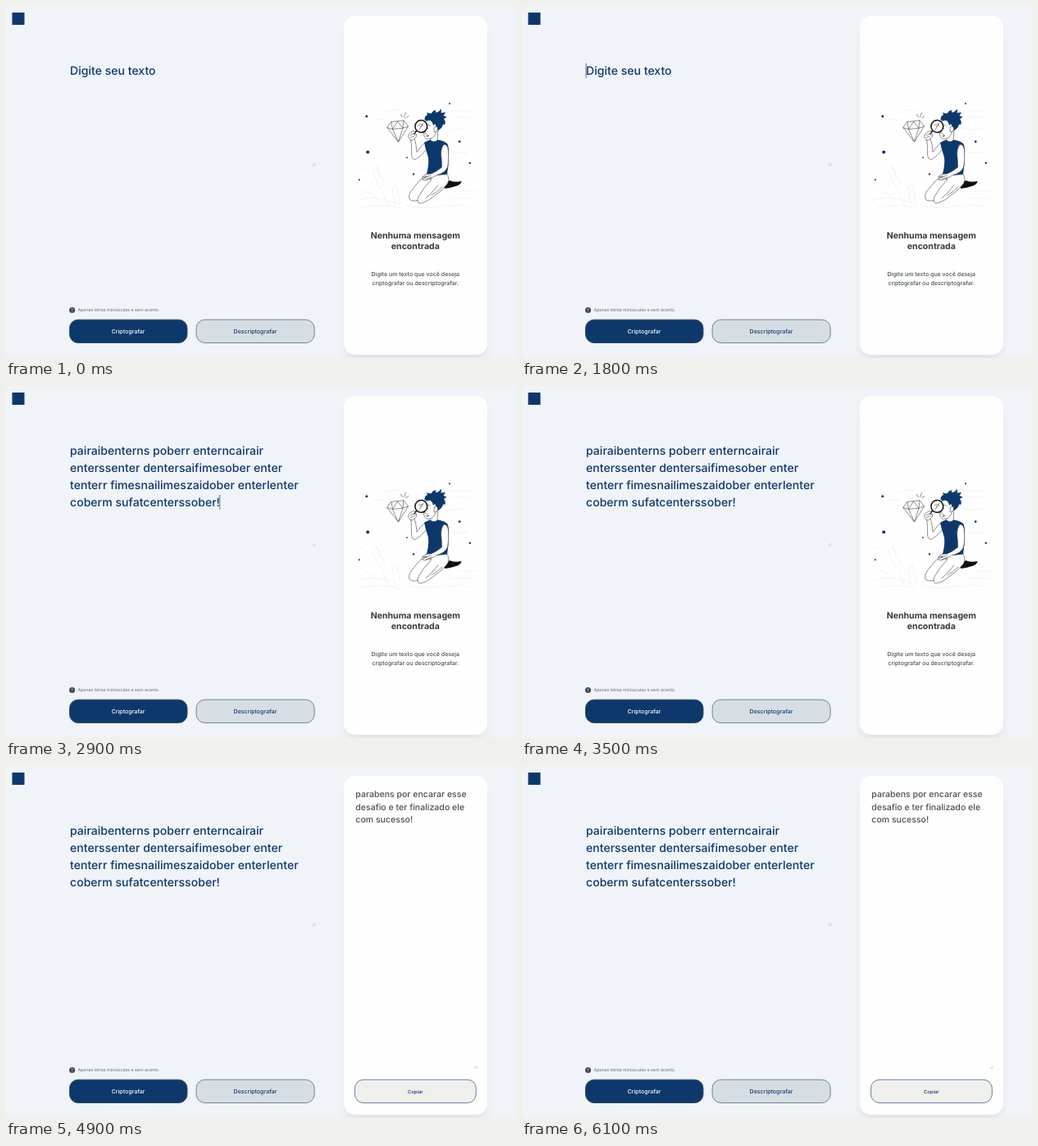
Recreate the animation shown at these times as an HTML page. Size 622x430 px, loop 8 s.

```html
<!DOCTYPE html>
<html lang="pt-BR">
<head>
<meta charset="utf-8">
<title>Criptografar texto</title>
<style>
  html, body { margin: 0; width: 100%; height: 100%; overflow: hidden; background: #f0f3f8; }
  #stage { position: relative; width: 622px; height: 430px; overflow: hidden; }
  #card {
    position: absolute; left: 411.5px; top: 11.5px; width: 175.5px; height: 414.5px;
    border-radius: 14px; background: #fdfefd; box-shadow: 0 10.5px 14px -3.5px rgba(0, 0, 0, .08);
  }
  svg { position: absolute; left: 0; top: 0; }
  text { font-family: Inter, sans-serif; font-weight: 500; text-rendering: geometricPrecision; }
  .navy { fill: #0d386c; }
  .input { font-size: 14.08px; fill: #0d386c; }
  .result { font-size: 10.56px; fill: #495057; }
  .title { font-size: 10.56px; font-weight: 700; fill: #343a40; text-anchor: middle; }
  .hint { font-size: 7.04px; fill: #495057; text-anchor: middle; }
  .label { font-size: 7.04px; text-anchor: middle; }
  .copy { font-size: 5.87px; text-anchor: middle; }
  .help { font-size: 5.28px; font-weight: 400; fill: #676c73; }
  .grip { stroke: #9a9ea5; stroke-width: .6; fill: none; }
  .ghost { fill: none; stroke: #edeeee; stroke-width: .7; stroke-linecap: round; }
  .ink, .skin { fill: none; stroke: #333; stroke-width: .55; stroke-linecap: round; stroke-linejoin: round; }
  .skin { fill: #fdfefd; }
</style>
</head>
<body>
<div id="stage">
  <div id="card"></div>
  <svg width="622" height="430" viewBox="0 0 622 430">
    <rect class="navy" x="7.5" y="8" width="15" height="15"/>

    <g id="placeholder"></g>
    <g id="typed"></g>
    <rect id="caret" class="navy" width=".7" height="18"/>
    <path class="grip" d="M374 195.3l3.2-3.2M376 195.3l1.2-1.2"/>

    <circle cx="80.6" cy="371.5" r="3.5" fill="#41464c"/>
    <path d="M80.6 369.5v2.3M80.6 373v.6" stroke="#fff" stroke-width=".75"/>
    <text class="help" x="87.5" y="373.4">Apenas letras minúsculas e sem acento.</text>

    <rect x="77.5" y="383.2" width="143.5" height="28.3" rx="10.5" fill="#0d386c" stroke="#2f4850" stroke-width=".9"/>
    <text class="label" x="149.1" y="400.4" fill="#fff">Criptografar</text>
    <rect x="232.1" y="383.2" width="144" height="28.3" rx="10.5" fill="#d7dee3" stroke="#5c7d8c" stroke-width=".9"/>
    <text class="label navy" x="304" y="400.4">Descriptografar</text>

    <g id="empty">
      <g class="ghost">
        <path d="M447 202l5-6 10 21-6 5zM452 196l4 13M471 221l5-3 5 23M471 221l3 20M459 226l8 19M446 229l7 8M444 215l5 4"/>
        <path d="M430 237q14-4 25-2t25 8M434 246q25-5 47 1M487 243q20 7 50 0M540 235h32M536 246q15-5 28-1M434 224l12 6"/>
        <path d="M460 130q12-5 22-2M447 139h14M539 128h28M545 136h22M537 150q14 3 24-1M545 179h18M552 226h22M431 196l8 5"/>
      </g>

      <g id="dots" class="navy"></g>

      <g class="ink">
        <path d="M470 141.5L485 139.8 490.5 147 478.5 166 465 148.8zM465 148.8L471.5 150.5 484 149.2 490.5 147M471.5 150.5L478.5 166 484 149.2M470 141.5L471.5 150.5 477.5 141 484 149.2 485 139.8"/>
        <path d="M481.5 132.3l1.7 3.2M487.6 130.2l-2.2 5.3M491 134.6l-3.4 2"/>
      </g>

      <!-- shoe, far leg, near leg -->
      <path d="M534 221q3-5 7-8 5 3 14.500 1 0 3-5 5.500-7 2.500-15 3.500z" fill="#111"/>
      <path class="skin" d="M514 204q-12 11-20 22-4 7-1.500 10.500 3 2.500 11 1 10-5 18-16z"/>
      <path class="skin" d="M519 204h18.500q4 7 1 13-8 10-19 17-9 7-15 7-4-2-1.500-8 6-11 15-20z"/>
      <path class="ink" d="M527 219q-8 10-15 16M532 221q-7 7-13 10"/>

      <!-- raised arm -->
      <path class="skin" d="M493.500 162q1.500 12 1 19 .5 7 5 6.500 7-4 13-12l-1-9q-6 5-10.500 12-.5-10-3-17z"/>

      <!-- neck, head and hair -->
      <path class="skin" d="M517.500 157l.5 8q4 4 8 0l1-15-6-2z"/>
      <path class="skin" d="M511.500 141q-2 8-2 14 0 7 5 7.500 6 0 9-6l4-10-4-8z"/>
      <path class="navy" d="M510.500 139q0-5 3.500-6l-1-3q4 2 6 1 1-3 5-4l0 3q4 0 6.500-4.500 1 3 0 5l5.500-.5-2.500 4 4 1.500-3.500 2.500q3 4 1 7l-2-.5q-1 5-6 7.500l-2.500 0q1-5-1.500-8l-2 2q-1-6-5-6.500-3 1-5.500-.5z"/>
      <path class="skin" d="M522.500 148q4-2 4 2t-4 4z"/>
      <path class="ink" d="M514 146q2-1 3.500 0M514.500 149v1M512 152l-1.500 3 2 .5"/>
      <circle cx="514" cy="158.500" r="1.200" class="ink"/>

      <!-- torso -->
      <path class="navy" d="M510 167q4-3 7.500-3.500 4 4 9 0 8 1 12 5 2 5 1.500 14 0 12-2 23-12 2.500-25-.5 3-11 2-20-3-9-5-18z"/>

      <!-- resting arm -->
      <path class="skin" d="M534 169q5 0 5.500 8 1 11-1 20-3 7-13 9.500-7 5-15 6.500l-3-1 6-4-6 1q3-4 11-4 7-3 13-8 0-8-1-16 0-8 3.500-12z"/>
      <path class="ink" d="M510 210l8-3M512 212l7-3"/>

      <!-- hand and magnifier -->
      <path d="M500.500 152.500l-4 5.500" stroke="#111" stroke-width="1.600" stroke-linecap="round"/>
      <path class="skin" d="M493 163.500l-2.500-4q0-3 3-5l4-2 1.500 2-2 2 3.500 0 0 3-4 4z"/>
      <path class="ink" d="M493 158l4-2M493.500 160.500l5-2"/>
      <circle cx="506.300" cy="147" r="7.400" fill="#fdfefd" fill-opacity=".9" stroke="#111" stroke-width="1.500"/>
      <path class="ink" d="M503 146q3-3 6 0M506 146.500v1M504 151l5-8"/>

      <g id="title"></g>
      <g id="hint"></g>
    </g>

    <g id="done">
      <g id="result"></g>
      <path class="grip" d="M571 369.800l3.200-3.200M573 369.800l1.200-1.200"/>
      <rect x="425.500" y="383.200" width="147.800" height="28.300" rx="10.500" fill="#efefec" stroke="#58759a" stroke-width=".9"/>
      <text class="copy navy" x="499.300" y="399.700">Copiar</text>
    </g>
  </svg>
</div>
<script>
  const LOOP = 8000;
  const byId = id => document.getElementById(id);
  const NS = 'http://www.w3.org/2000/svg';

  function add(parent, tag, attrs, content = '') {
    const el = document.createElementNS(NS, tag);
    for (const key in attrs) el.setAttribute(key, attrs[key]);
    el.textContent = content;
    byId(parent).append(el);
  }

  function addLines(parent, cls, x, y, leading, lines) {
    lines.forEach((line, i) => add(parent, 'text', { class: cls, x, y: y + i * leading }, line));
  }

  addLines('placeholder', 'input', 78, 83.8, 21.1, ['Digite seu texto']);
  addLines('typed', 'input', 78, 83.8, 21.1, [
    'pairaibenterns poberr enterncairair',
    'enterssenter dentersaifimesober enter',
    'tenterr fimesnailimeszaidober enterlenter',
    'coberm sufatcenterssober!'
  ]);
  addLines('title', 'title', 499.3, 284.2, 12.7, ['Nenhuma mensagem', 'encontrada']);
  addLines('hint', 'hint', 499.3, 330.2, 10.56, [
    'Digite um texto que você deseja', 'criptografar ou descriptografar.'
  ]);
  addLines('result', 'result', 426.3, 37.7, 15.84, [
    'parabens por encarar esse', 'desafio e ter finalizado ele', 'com sucesso!'
  ]);

  const dots = [
    [439.8, 134.7, 1.5], [441.2, 178.5, 2], [541, 119.3, 1], [553.2, 165.7, 1.4],
    [565.8, 191.7, 1.2], [497, 205.4, 1.2], [489, 185.2, .9], [430.8, 212.2, 1]
  ];
  for (const [cx, cy, r] of dots) add('dots', 'circle', { cx, cy, r });

  // start time, text pasted, result shown, caret position
  const START = [77.7, 70], END = [260.5, 133];
  const steps = [
    [0, false, false, null],
    [1800, false, false, START],
    [2500, false, false, null],
    [2900, true, false, END],
    [3500, true, false, null],
    [4100, true, false, END],
    [4600, true, false, null],
    [4900, true, true, null]
  ];

  const show = (id, on) => { byId(id).style.display = on ? '' : 'none'; };

  function draw(now) {
    const t = now % LOOP;
    const [, pasted, done, caret] = steps.findLast(step => step[0] <= t);
    show('placeholder', !pasted);
    show('typed', pasted);
    show('empty', !done);
    show('done', done);
    show('caret', caret);
    if (caret) {
      byId('caret').setAttribute('x', caret[0]);
      byId('caret').setAttribute('y', caret[1]);
    }
  }

  const origin = performance.now();
  function tick() {
    draw(performance.now() - origin);
    requestAnimationFrame(tick);
  }
  tick();
</script>
</body>
</html>
```
